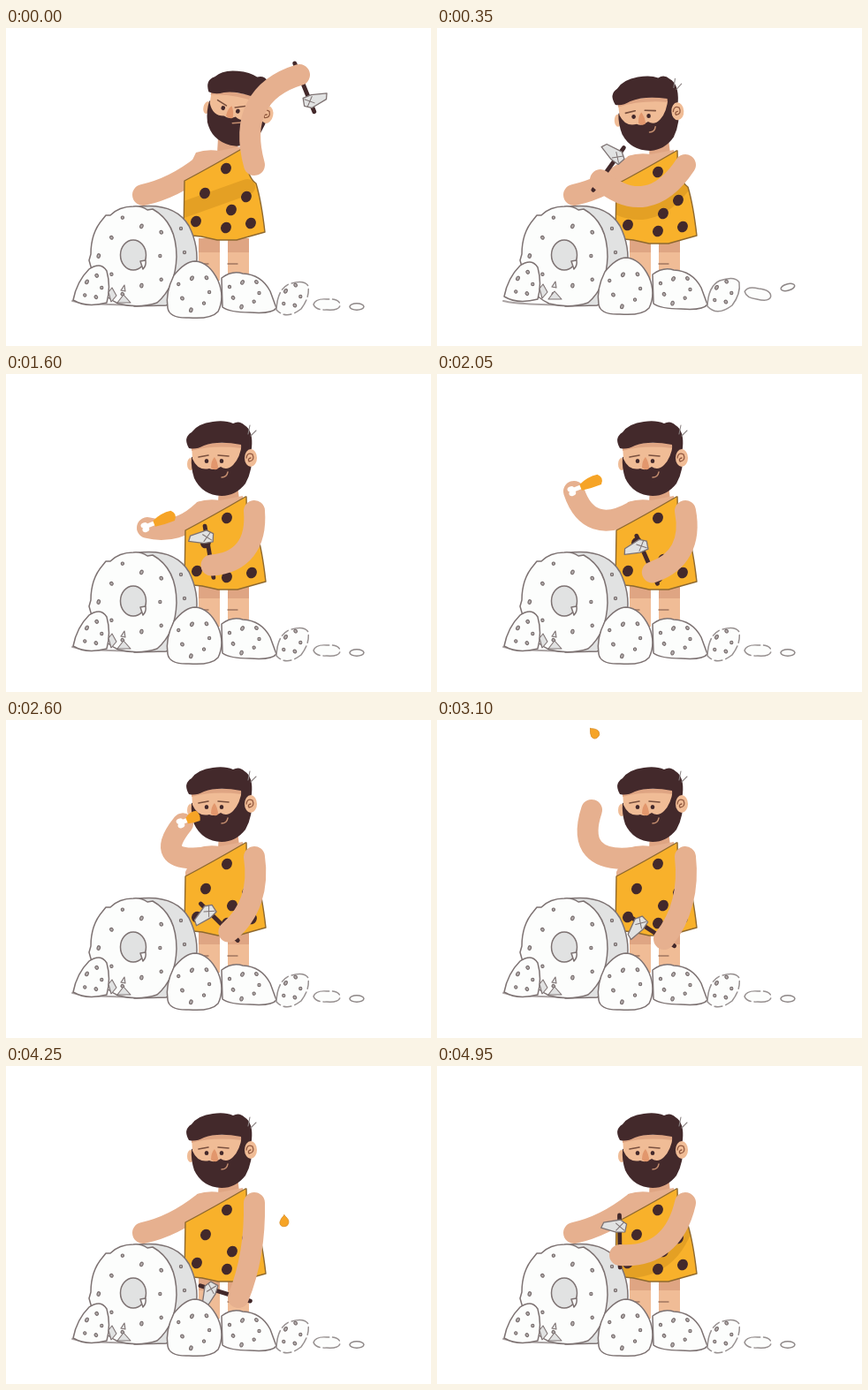
An HTML page with a canvas that plays this animation: 481 px wide and 360 px high, repeating every 5 s.

```html
<!DOCTYPE html>
<html lang="en">
<head>
<meta charset="utf-8">
<title>Caveman and the wheel</title>
<style>
  html, body { margin: 0; width: 100%; height: 100%; overflow: hidden; background: #fff; }
  canvas { display: block; }
</style>
</head>
<body>
<canvas id="stage" width="481" height="360"></canvas>
<script>
const ctx = document.getElementById('stage').getContext('2d');
const LOOP = 5000, STEP = 50;
const SKIN = '#e6b08f', FACE = '#f0bc96', SHADE = '#dfa583', HAIR = '#43292b';
const GOLD = '#f8b12b', LINE = '#7d7272', STONE = '#fcfdfc', GREY = '#e1e2e2';
const RELEASE = 2950;

// Hand positions: time, x, y. Elbows and the axe follow from them.
const axeHand = [[0, 332, 53], [200, 200, 180], [350, 185, 172], [1100, 172, 188],
  [1750, 242, 221], [3100, 257, 248], [4250, 263, 262], [4950, 207, 214]];
const freeHand = [[0, 155, 189], [750, 155, 189], [1100, 165, 120], [1400, 165, 215],
  [1800, 155, 133], [2200, 155, 133], [2500, 205, 122], [RELEASE, 166, 85],
  [3100, 175, 102], [3900, 155, 189]];

function at(keys, t) {
  const i = keys.findIndex(k => k[0] > t);
  if (i < 0) return keys[keys.length - 1].slice(1);
  const a = keys[i - 1], b = keys[i];
  const u = (t - a[0]) / (b[0] - a[0]), e = u * u * (3 - 2 * u);
  return [1, 2].map(j => a[j] + (b[j] - a[j]) * e);
}

// An arm bends more the higher its hand is above the hanging height.
function limb([sx, sy], [hx, hy], hanging) {
  const dx = hx - sx, dy = hy - sy, length = Math.hypot(dx, dy);
  const bend = Math.max(0, Math.min(36, (hanging - hy) * .4)) / length;
  const handle = u => [sx + dx * u + dy * bend, sy + dy * u - dx * bend];
  const elbow = handle(.35), wrist = handle(.7);
  return {
    path: `M${sx} ${sy}C${elbow} ${wrist} ${hx} ${hy}`,
    angle: Math.atan2(hy - wrist[1], hx - wrist[0]) * 180 / Math.PI
  };
}

function shape(d, fill, stroke, width = 1.5) {
  const path = new Path2D(d);
  if (fill) { ctx.fillStyle = fill; ctx.fill(path); }
  if (stroke) { ctx.strokeStyle = stroke; ctx.lineWidth = width; ctx.stroke(path); }
}

function oval(x, y, rx, ry, fill, stroke, turn = 0, width = 1.5) {
  ctx.beginPath();
  ctx.ellipse(x, y, rx, ry, turn, 0, 7);
  if (fill) { ctx.fillStyle = fill; ctx.fill(); }
  if (stroke) { ctx.strokeStyle = stroke; ctx.lineWidth = width; ctx.stroke(); }
}

function placed(x, y, degrees, draw) {
  ctx.save();
  ctx.translate(x, y);
  ctx.rotate(degrees * Math.PI / 180);
  draw();
  ctx.restore();
}

const pit = (x, y, i = 0) => oval(x, y, 1.6 + i % 3 * .4, 1.7, '#b5aeae', '#756b6b', i, 1.1);

// Pits in a staggered ring.
function pits(x, y, rx, ry, count) {
  for (let i = 0; i < count; i++) {
    const a = -i / count * 2 * Math.PI, r = i % 2 ? .8 : .62;
    pit(x + Math.cos(a) * rx * r, y + Math.sin(a) * ry * r, i);
  }
}

function legs() {
  for (const x of [218, 251]) {
    shape(`M${x} 238h24v48h-24z`, FACE);
    shape(`M${x} 238h24v16h-24z`, SHADE);
    shape(`M${x} 267h11`, null, '#a07660', 1.3);
  }
}

function tunic(t, shadowPath) {
  const cloth = 'M271 139 Q235 160 203 177 L202 236 L212 239 L222 240 L240 244 L262 244 ' +
    'L294 235 Q290 200 284 180 Q272 172 272 139Z';
  shape(cloth, GOLD);
  ctx.save();
  ctx.clip(new Path2D(cloth));
  placed(0, 14, 0, () => {
    const shadow = 'rgba(188,128,24,.35)';
    if (t < 150) shape('M198 197L274 170', null, shadow, 18);
    else if (shadowPath) shape(shadowPath, null, shadow, 24);
  });
  for (const [x, y] of [[250, 163], [226, 191], [216, 223], [256, 210], [273, 195], [250, 230], [278, 225]])
    oval(x, y, 5.8, 6.5, HAIR, null, .5);
  ctx.restore();
  shape(cloth, null, '#8f692f', 1.4);
}

function head(angry) {
  oval(209, 102, 4, 7, FACE);
  shape('M210 94 L266 82 L278 86 Q280 108 271 124 Q260 138 244 138 Q222 137 213 118 Q209 106 210 94Z', HAIR);
  shape('M210 80 L267 79 Q265 95 257 103 Q250 110 243 105 Q236 110 230 107 Q217 110 211 96Z', FACE);
  shape('M210 79 L267 77 L266 84 Q235 80 210 87Z', SHADE);
  shape('M207 84 Q200 72 210 66 Q217 56 234 54 Q248 52 257 56 Q264 52 270 58 ' +
    'Q280 64 278 84 L274 96 L267 95 L266 80 Q240 75 224 81 Q215 86 207 84Z', HAIR);
  oval(277, 95, 7, 10, FACE);
  shape('M272 95 Q273 88 279 91 Q282 98 275 99 Q273 96 277 95', null, '#91583f', 1.3);
  shape('M274 68L276 58M277 70L283 64', null, '#8d8585', 1.1);
  shape('M236 94 Q240 100 240 107 Q236 110 232 106 Q232 98 236 94Z', '#e2976d');
  oval(227, 98.5, 2.3, 2.5, HAIR);
  oval(244, 98.5, 2.3, 2.5, HAIR);
  shape(angry ? 'M219 91L230 95M240 95L251 91' : 'M218 94L229 92M240 92L252 93', null, '#7b513f', 1.6);
  shape(angry ? 'M241 113L251 110' : 'M244 117Q250 117 251 111', null, '#c58f70', 1.5);
}

function axe() {
  shape('M-14 0H45', null, HAIR, 4.8);
  shape('M26 6L35 8L40 1L37 -18L31 -21L26 -4Z', GREY, LINE, 1.3);
  shape('M28 -4L37 5M36 -4L28 5', null, LINE, 1);
}

function drumstick(size) {
  oval(-3, -2, 4, 3, '#fff');
  oval(-3, 3, 4, 3, '#fff');
  shape('M0 0H8', null, '#fff', 5);
  ctx.scale(size, 1);
  shape('M8 -3 Q20 -8 31 -6 Q37 0 31 6 Q20 6 8 4Z', '#f6a426');
}

function wheel() {
  shape('M75 309Q95 314 180 314', null, '#aaa3a3', 2);
  shape('M145 203 Q190 196 207 224 Q219 248 215 272 Q208 306 181 314 L145 315Z', GREY, LINE);
  shape('M144 202 Q153 201 160 206 L166 205 Q193 220 193 259 Q192 293 171 311 ' +
    'Q150 318 127 312 Q101 300 96 270 L94 263 L96 256 Q96 232 109 217 L113 212 L118 212 Q128 202 144 202Z', STONE, LINE);
  oval(144, 257, 14.5, 17, GREY, LINE);
  shape('M158 263L152 264L155 273Q159 269 158 263Z', STONE, LINE);
  pits(144, 258, 49, 57, 10);
  pit(198, 227);
  pit(202, 254);
}

function bigRocks() {
  shape('M76 308 Q80 287 94 273 Q107 264 114 275 Q119 293 114 311 Q91 317 76 308Z', STONE, LINE);
  pits(99, 294, 15, 18, 5);
  shape('M116 299L120 294L125 303L119 310ZM126 311L133 302L141 311ZM130 297L134 291L135 298Z', GREY, LINE, 1.1);
  shape('M183 317 Q180 300 190 280 Q203 264 214 264 Q230 265 240 286 Q248 305 240 321 ' +
    'Q232 330 207 328 Q185 329 183 317Z', STONE, LINE);
  pits(214, 299, 26, 26, 7);
  shape('M245 316 L244 283 Q256 274 268 278 Q289 279 299 298 L306 317 Q301 324 276 322 Q253 322 245 316Z', STONE, LINE);
  pits(271, 300, 25, 20, 7);
}

// The small stones have faint, broken outlines while they lie still.
function smallRocks(lift) {
  if (!lift) ctx.setLineDash([20, 4, 9, 4]);
  placed(0, -4 * lift, 0, () => {
    shape('M306 319 Q307 296 320 290 Q337 284 342 292 Q344 305 334 318 Q317 331 306 319Z', STONE, '#979090');
    ctx.setLineDash([]);
    pits(324, 304, 15, 17, 5);
    if (!lift) ctx.setLineDash([24, 4]);
  });
  placed(363, 313 - 12 * lift, 10 * lift, () =>
    shape('M-15 0 Q-13 -7 0 -6 Q15 -7 15 1 Q14 7 0 6 Q-12 7 -15 0Z', STONE, '#979090'));
  ctx.setLineDash([]);
  placed(397, 315.5 - 22 * lift, -15 * lift, () => oval(0, 0, 8, 3.7, STONE, '#8d8686'));
}

function thrownFood(t) {
  const s = (t - 3100) / 1000;
  const x = 178 + 119 * s, y = 15 - 334 * s + 412 * s * s;
  if (y > 305) return;
  placed(x, y, s < .4 ? -40 : 0, () =>
    shape('M0 -7 Q6 -2 5 2 Q4 6 0 6 Q-5 6 -5 1 Q-4 -3 0 -7Z', '#f6a426', '#d98f2b', .8));
}

function draw(t) {
  const hand = at(axeHand, t), free = at(freeHand, t);
  const arm = limb([281, 155], hand, 280), freeArm = limb([222, 156], free, 203);
  const sway = Math.cos(Math.PI * t / 450) * Math.exp(-t / 300);
  const lean = Math.max(0, sway);
  const lift = t > 200 && t < 500 ? Math.sin(Math.PI * (t - 200) / 300) : 0;

  ctx.clearRect(0, 0, 481, 360);
  ctx.lineCap = ctx.lineJoin = 'round';
  legs();
  if (t >= RELEASE) thrownFood(t);

  placed(-lean, -4 * lean, 0, () => {
    shape('M241 128L262 126L264 142L240 146Z', SHADE);
    shape('M216 145 Q228 141 242 143L268 138L270 175L203 190L203 172Z', SKIN);
  });
  shape(freeArm.path, null, SKIN, 24);
  placed(-lean, -4 * lean, 0, () => tunic(t, hand[0] < 230 && arm.path));
  placed(236 + 18 * sway, 101 - 6 * sway, 12.5 * sway, () => {
    ctx.translate(-236, -101);
    head(t < 200);
  });
  if (t >= 1400 && t < RELEASE)
    placed(free[0], free[1] - 2, -22, () => drumstick(t < 2550 ? 1 : .6));

  wheel();
  placed(...hand, arm.angle + 85, axe);
  shape(arm.path, null, SKIN, 24);
  placed(0, -4 * lift, 0, bigRocks);
  smallRocks(lift);
}

function tick(now) {
  draw(Math.floor(now % LOOP / STEP) * STEP);
  requestAnimationFrame(tick);
}
requestAnimationFrame(tick);
</script>
</body>
</html>
```
